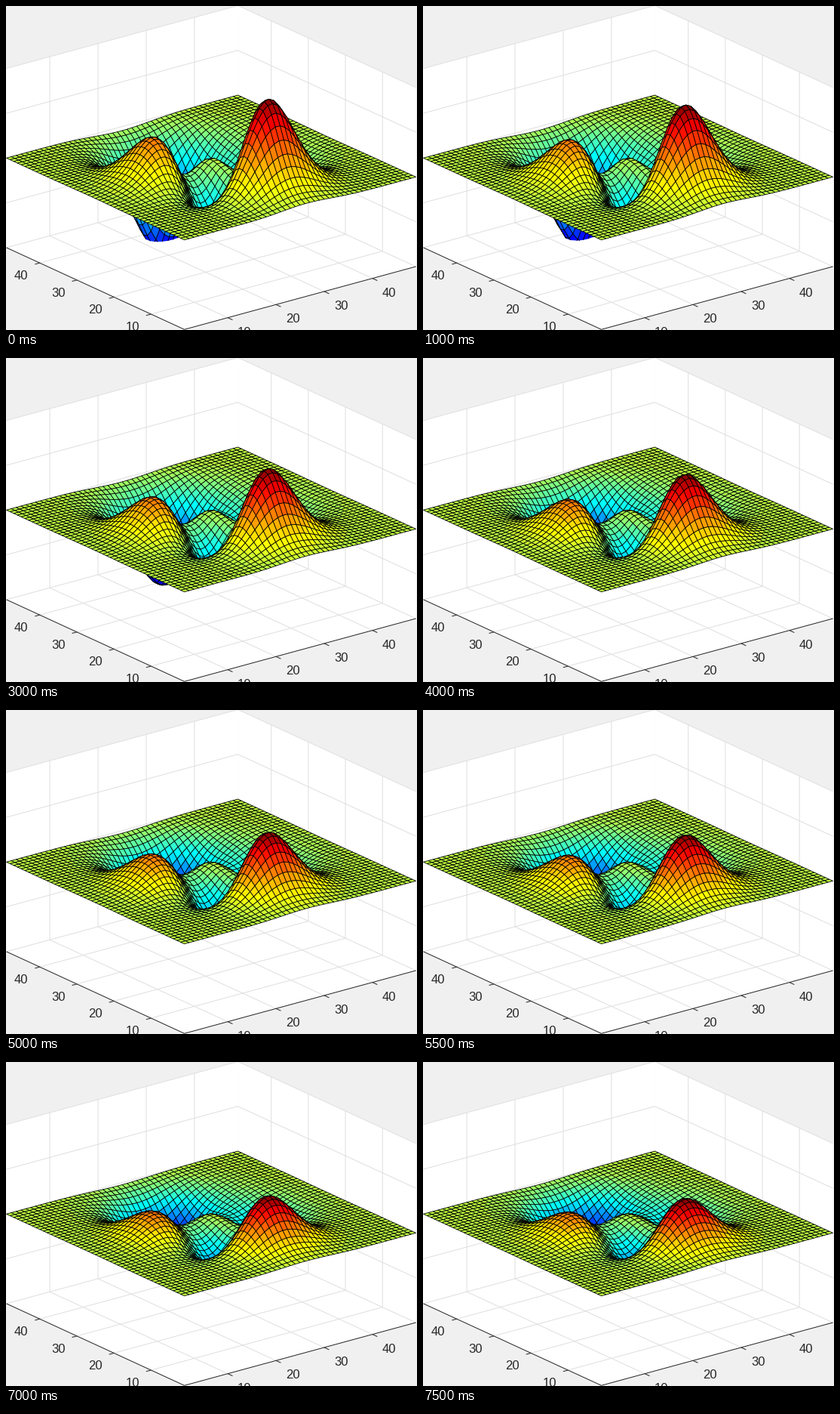
A matplotlib script that plays this animation: 545x429 px, repeating every 8000 ms.

```python
import numpy as np
import matplotlib.pyplot as plt
from matplotlib.animation import FuncAnimation
from matplotlib.collections import LineCollection, PolyCollection

W, H, DPI = 545, 429, 100
FRAMES, INTERVAL = 16, 500
N = 49                      # grid points per side
ZLIM = 10
PX = 72 / DPI               # one pixel in points
AXIS, GRID = "#262626", "#dfdfdf"

ORIGIN = np.array([236.5, 309.7])           # screen position of (1, 1, 0)
EX = np.array([307.0, -83.3]) / (N - 1)
EY = np.array([-236.0, -108.4]) / (N - 1)
EZ = np.array([0, -11.86])


def project(p):
    p = np.asarray(p, float)
    return ORIGIN + (p[..., :1] - 1) * EX + (p[..., 1:2] - 1) * EY + p[..., 2:] * EZ


def peaks(x, y):
    return (3 * (1 - x) ** 2 * np.exp(-x**2 - (y + 1) ** 2)
            - 10 * (x / 5 - x**3 - y**5) * np.exp(-x**2 - y**2)
            - np.exp(-(x + 1) ** 2 - y**2) / 3)


def jet(v):
    i = np.clip(np.floor(v * 64) + 1, 1, 64)
    ramp = lambda lo, hi: np.clip(np.minimum(i - lo, hi - i) / 16, 0, 1)
    return np.stack([ramp(24, 72), ramp(8, 56), ramp(-8, 40)], axis=-1)


def clip_floor(quad):
    """Part of a quad above the floor, as an open outline along the cut."""
    low = quad[:, 2] < -ZLIM
    start = next(k for k in range(4) if low[k] and not low[(k + 1) % 4])
    q = np.roll(quad, -start, axis=0)
    q = np.vstack([q, q[:1]])

    def cut(a, b):
        return a + (b - a) * (-ZLIM - a[2]) / (b[2] - a[2])

    out = [cut(q[0], q[1])]
    for a, b in zip(q[1:], q[2:]):
        out.append(a)
        if b[2] < -ZLIM:
            out.append(cut(a, b))
            break
    return np.array(out)


ticks = np.arange(1, N + 1)
gx, gy = np.meshgrid(ticks, ticks)
base = -peaks((gx - 25) / 8, (gy - 25) / 8)
shade = (base - base.min()) / (base.max() - base.min())
colors = jet(shade[:-1, :-1]).reshape(-1, 3)[::-1]      # far cells first


def surface(amp):
    pts = np.stack([gx, gy, amp * base], axis=-1).astype(float)
    quads = np.stack([pts[:-1, :-1], pts[:-1, 1:], pts[1:, 1:], pts[1:, :-1]],
                     axis=2).reshape(-1, 4, 3)[::-1]
    polys, fills = [], []
    for quad, color in zip(quads, colors):
        low = quad[:, 2] < -ZLIM
        if low.all():
            continue
        shape = clip_floor(quad) if low.any() else np.vstack([quad, quad[:1]])
        polys.append(project(shape))
        fills.append(color)
    return polys, fills


fig = plt.figure(figsize=(W / DPI, H / DPI), dpi=DPI, facecolor="#f0f0f0")
ax = fig.add_axes([0, 0, 1, 1])
ax.set_xlim(0, W)
ax.set_ylim(H, 0)
ax.axis("off")

# Floor and back walls
lo, hi = -ZLIM, ZLIM
panels = [
    [(1, 1, lo), (N, 1, lo), (N, N, lo), (1, N, lo)],
    [(1, N, lo), (N, N, lo), (N, N, hi), (1, N, hi)],
    [(N, 1, lo), (N, N, lo), (N, N, hi), (N, 1, hi)],
]
ax.add_collection(PolyCollection([project(p) for p in panels],
                                 facecolors="white", edgecolors="white",
                                 linewidths=0.3, zorder=1))

grid = []
for t in (10, 20, 30, 40):
    grid.append([(t, 1, lo), (t, N, lo), (t, N, hi)])
    grid.append([(1, t, lo), (N, t, lo), (N, t, hi)])
for z in (-10, -5, 0, 5, 10):
    grid.append([(1, N, z), (N, N, z), (N, 1, z)])
ax.add_collection(LineCollection([project(g) for g in grid], colors=GRID,
                                 linewidths=PX, zorder=2))

# Axis lines, ticks and labels
rulers = [project([(1, N, lo), (1, 1, lo), (N, 1, lo)])]
for t in (10, 20, 30, 40):
    for end, step, shift in (((t, 1, lo), -EY * 1.3, (22.4, 17.9)),
                             ((1, t, lo), -EX, (-24.6, 15.8))):
        p = project(end)
        rulers.append(np.array([p, p + step]))
        x, y = p + shift
        ax.text(x, y + 6, str(t), family="Liberation Sans", size=12,
                color=AXIS, ha="center", va="baseline", zorder=3)
ax.add_collection(LineCollection(rulers, colors=AXIS, linewidths=PX, zorder=3))

# Neighbouring cells both stroke a shared edge, so the line is kept thin
mesh = PolyCollection([], closed=False, edgecolors="black",
                      linewidths=0.8 * PX, joinstyle="round", zorder=4)
ax.add_collection(mesh)


def draw(k):
    polys, fills = surface(1.5 - 0.05 * k)
    mesh.set_verts(polys, closed=False)
    mesh.set_facecolor(fills)
    return [mesh]


anim = FuncAnimation(fig, draw, frames=FRAMES, interval=INTERVAL,
                     repeat=True, repeat_delay=0)
plt.show()
```
